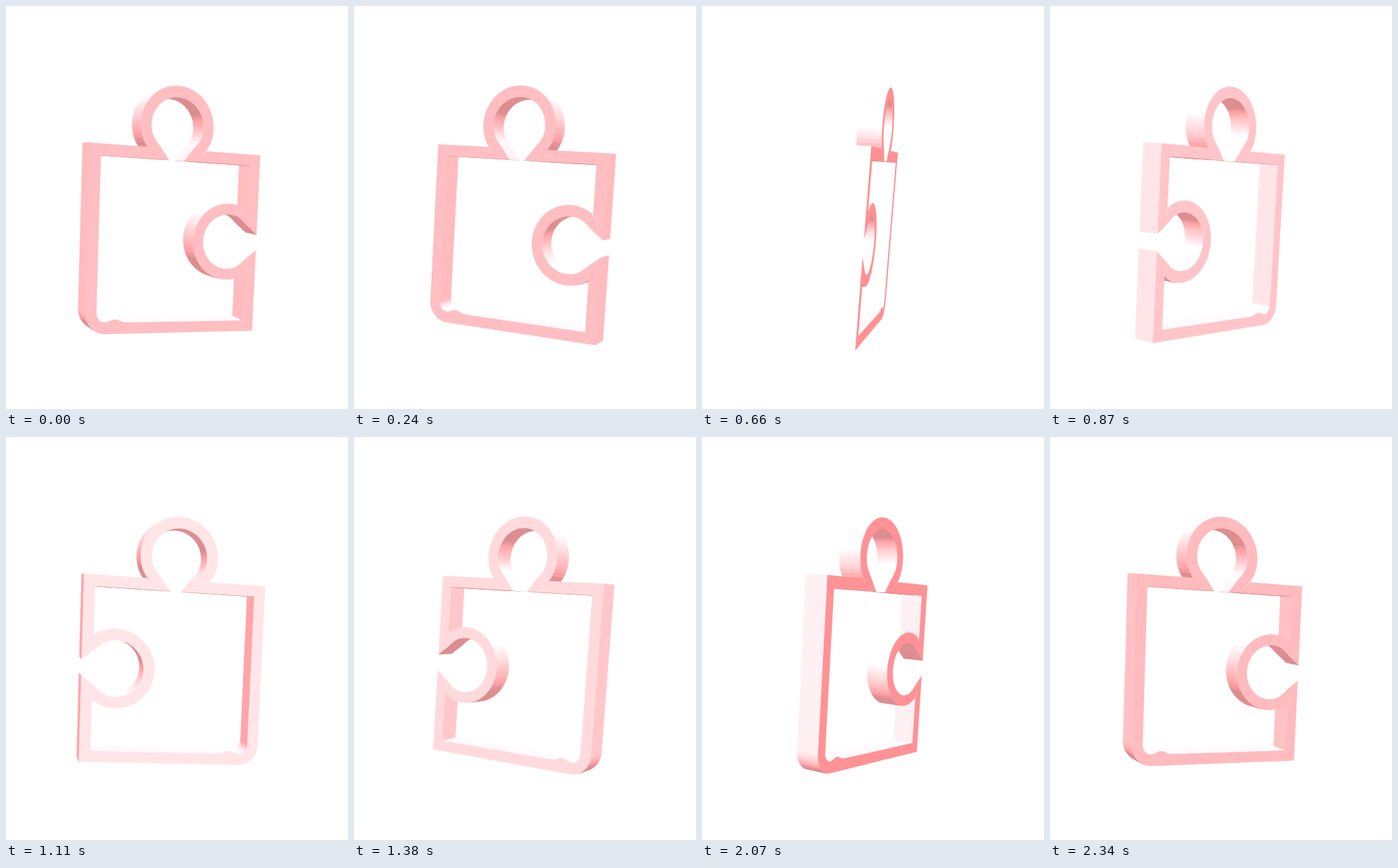
Write an HTML page with a canvas that moves like this. It is 498 px wide and 586 px high and loops after 2.37 s.

```html
<!DOCTYPE html>
<html lang="en">
<head>
<meta charset="utf-8">
<title>Turning puzzle piece</title>
<style>
  html, body { margin: 0; width: 100%; height: 100%; overflow: hidden; background: #fff; }
  canvas { display: block; }
</style>
</head>
<body>
<canvas id="stage" width="498" height="586"></canvas>
<script>
const ctx = document.getElementById('stage').getContext('2d');
const LOOP = 2370, STEP = 30;
const SIDE = 123.5, HALF_BAND = 8, HALF_DEPTH = 17.5, HEAD = 48;
const CENTER_X = 240, CENTER_Y = 341, CAMERA = 1150;
const PITCH = 0.09, ROLL = 0.064, SWAY = 0.027;
const RAD = Math.PI / 180;

const mix = (a, b, t) => a + (b - a) * t;

// Centre line of the band, clockwise
const line = [];
const add = (x, y) => line.push([x, y]);

function edgeTo(x, y, steps = 12) {
  const [x0, y0] = line[line.length - 1];
  for (let i = 1; i <= steps; i++) add(mix(x0, x, i / steps), mix(y0, y, i / steps));
}

function arc(cx, cy, r, from, to, steps) {
  for (let i = 0; i <= steps; i++) {
    const a = mix(from, to, i / steps) * RAD;
    add(cx + r * Math.cos(a), cy + r * Math.sin(a));
  }
}

// Half of the neck, from the edge (t = 0) to the round head (t = 1)
function neck(t) {
  const s = 1 - t;
  const bezier = (a, b, c, d) => a*s*s*s + 3*b*s*s*t + 3*c*s*t*t + d*t*t*t;
  return [bezier(28, 33, 41.7, 45.1), bezier(0, 7.3, 14, 23.6)];
}

// place(u, v): u runs along the edge, v away from it
function tab(place) {
  for (let i = 0; i < 6; i++) {
    const [u, v] = neck(i / 6);
    place(-u, v);
  }
  for (let a = 200; a >= -20; a -= 5) {
    place(HEAD * Math.cos(a * RAD), 40 + HEAD * Math.sin(a * RAD));
  }
  for (let i = 5; i >= 0; i--) place(...neck(i / 6));
}

add(-SIDE, -SIDE);
tab((u, v) => add(u - 3, -SIDE - v));
edgeTo(SIDE, -SIDE);
tab((u, v) => add(SIDE - v, u - 2));
edgeTo(SIDE, SIDE);
edgeTo(-SIDE + 22, SIDE, 40);
arc(-SIDE + 22, SIDE - 22, 22, 97, 180, 14);
edgeTo(-SIDE, -SIDE + 10);

// Contour beside the centre line, with mitred corners
function offset(dist) {
  const n = line.length;
  const normal = (p, q) => {
    const dx = q[0] - p[0], dy = q[1] - p[1], len = Math.hypot(dx, dy) || 1;
    return [dy / len, -dx / len];
  };
  return line.map((p, i) => {
    const a = normal(line[(i + n - 1) % n], p), b = normal(p, line[(i + 1) % n]);
    const k = dist / (1 + a[0] * b[0] + a[1] * b[1]);
    const x = p[0] + (a[0] + b[0]) * k;
    let y = p[1] + (a[1] + b[1]) * k;
    if (dist < 0 && y > 110) y -= 5 * Math.exp(-(((x + 88) / 9) ** 2));
    return [x, y];
  });
}
const contours = [offset(HALF_BAND), offset(-HALF_BAND)];

function spin(u) {
  return (360 * (u + 0.25 * u * (1 - u)) - 2 * Math.cos(4 * Math.PI * u) - 21) * RAD;
}

function projector(angle) {
  const cos = Math.cos(angle), sin = Math.sin(angle);
  const lean = ROLL + SWAY * Math.sin(2 * angle - 54 * RAD);
  return (x, y, z) => {
    const depth = x * sin + z * cos;
    const near = depth - y * PITCH;
    const k = CAMERA / (CAMERA - near);
    const px = (x * cos - z * sin) * k, py = (y + depth * PITCH) * k;
    return [CENTER_X + px - py * lean, CENTER_Y + py + px * ROLL, near];
  };
}

function area(pts) {
  let sum = 0;
  pts.forEach((p, i) => {
    const q = pts[(i + 1) % pts.length];
    sum += p[0] * q[1] - q[0] * p[1];
  });
  return sum;
}

function tint(light, warmth) {
  const g = Math.min(255, light);
  return `rgb(${Math.min(255, g * warmth)},${g},${Math.min(255, g + 3)})`;
}

function trace(pts) {
  pts.forEach((p, i) => i ? ctx.lineTo(p[0], p[1]) : ctx.moveTo(p[0], p[1]));
  ctx.closePath();
}

function draw(time) {
  const angle = spin(Math.floor(time % LOOP / STEP) * STEP / LOOP);
  const project = projector(angle), sin = Math.sin(angle);
  const at = z => contours.map(c => c.map(([x, y]) => project(x, y, z)));
  const front = at(HALF_DEPTH), back = at(-HALF_DEPTH);
  const walls = [];

  contours.forEach((contour, c) => {
    const side = c ? -1 : 1;
    contour.forEach((p, i) => {
      const j = (i + 1) % contour.length, q = contour[j];
      const quad = [front[c][i], front[c][j], back[c][j], back[c][i]];
      if (area(quad) * side >= 0) return;
      const dx = q[0] - p[0], dy = q[1] - p[1], len = Math.hypot(dx, dy) || 1;
      const facing = Math.abs(dy / len * sin), down = -dx / len * side;
      const light = Math.max(140, 140 + 120 * facing - down * (down > 0 ? 85 : 110));
      walls.push({ quad, light, depth: quad.reduce((s, v) => s + v[2], 0) });
    });
  });

  ctx.fillStyle = '#fff';
  ctx.fillRect(0, 0, 498, 586);
  ctx.lineWidth = 0.6;
  ctx.lineJoin = 'round';
  walls.sort((a, b) => a.depth - b.depth).forEach(({ quad, light }) => {
    ctx.fillStyle = ctx.strokeStyle = tint(light, 1.57);
    ctx.beginPath();
    trace(quad);
    ctx.fill();
    ctx.stroke();
  });

  const showFront = area(front[0]) > 0;
  if (!showFront && area(back[0]) > 0) return;
  const turned = Math.abs(Math.cos(angle));
  ctx.fillStyle = tint(showFront ? 81 + 118 * turned : 127 + 104 * turned, 1.84);
  ctx.beginPath();
  (showFront ? front : back).forEach(trace);
  ctx.fill('evenodd');
}

function loop() {
  draw(performance.now());
  requestAnimationFrame(loop);
}
loop();
</script>
</body>
</html>
```
